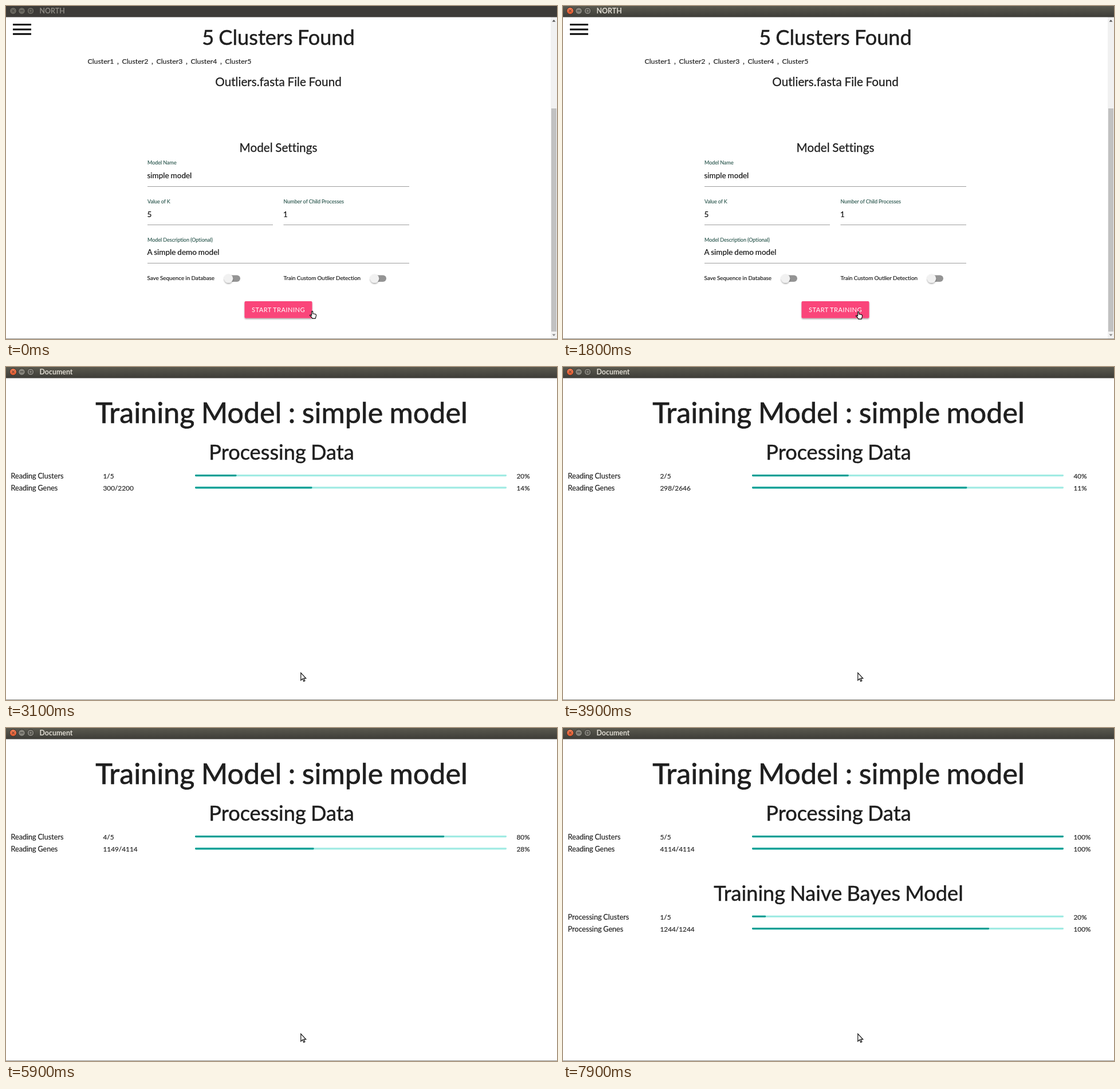
An HTML page that plays this animation: 962 px wide and 582 px high, repeating every 8 s.

```html
<!DOCTYPE html>
<html lang="en">
<head>
<meta charset="utf-8">
<title>Model training</title>
<style>
  html, body { margin: 0; width: 100%; height: 100%; overflow: hidden; background: #fff; }
  svg { display: block; width: 100%; height: 100%; }
  text {
    font: 12.6px Lato, "Open Sans", sans-serif; font-variant-ligatures: none;
    word-spacing: -.03em; white-space: pre;
    color: #1f1f1f; fill: currentColor; stroke: currentColor; stroke-width: .014em;
  }
  .mid { text-anchor: middle; }
  .h1 { font-size: 50.2px; }
  .h3 { font-size: 36.2px; }
  .h5 { font-size: 20.7px; }
  .label { font-size: 9px; color: #27544b; }
  .input { font-size: 13.5px; color: #111; }
  .option { font-size: 9.9px; color: #111; }
  .count { font-size: 11.8px; }
  .button { font-size: 11.2px; letter-spacing: .4px; color: #fff; stroke: none; }
  .caption { font-size: 12.4px; font-weight: bold; stroke: none; }
  .rule { stroke: #9e9e9e; }
</style>
</head>
<body>
<svg viewBox="0 0 962 582" preserveAspectRatio="none">
  <defs>
    <linearGradient id="active" x2="0" y2="1">
      <stop offset="0" stop-color="#5a594f"/><stop offset="1" stop-color="#3d3c37"/>
    </linearGradient>
    <linearGradient id="closeFill" x2="0" y2="1">
      <stop offset="0" stop-color="#f58159"/><stop offset="1" stop-color="#e4572b"/>
    </linearGradient>
    <filter id="shadow" x="-30%" y="-30%" width="160%" height="180%">
      <feDropShadow dx="0" dy="1.5" stdDeviation="1.3" flood-opacity=".38"/>
    </filter>
    <clipPath id="buttonShape"><rect x="416.5" y="516" width="118" height="29.5" rx="2"/></clipPath>
  </defs>
  <rect width="962" height="582" fill="#fff"/>

  <g id="form">
    <path d="M12 32.5H44M12 41H44M12 49H44" stroke="#000" stroke-width="3.2"/>
    <rect x="951" y="19" width="11" height="562" fill="#f1f1f1"/>
    <rect x="952" y="179" width="9" height="390" fill="#c1c1c1"/>
    <path d="M953.5 27.5l3-3.5l3 3.5z" fill="#505050"/>
    <path d="M953.5 573.5l3 3.5l3-3.5z" fill="#8a8a8a"/>
    <text class="h3 mid" x="475.5" y="68">5 Clusters Found</text>
    <text class="h5 mid" x="475.5" y="139.5">Outliers.fasta File Found</text>
    <text class="h5 mid" x="475.5" y="254.5">Model Settings</text>
    <text class="label" x="247" y="277">Model Name</text>
    <text class="input" x="246.5" y="301">simple model</text>
    <text class="label" x="247" y="344.5">Value of K</text>
    <text class="input" x="246.5" y="368.5">5</text>
    <text class="label" x="484.5" y="344.5">Number of Child Processes</text>
    <text class="input" x="484" y="368.5">1</text>
    <text class="label" x="247" y="412">Model Description (Optional)</text>
    <text class="input" x="246.5" y="435">A simple demo model</text>
    <path class="rule" d="M247 315.5H704M247 382.5H466M484.5 382.5H704M247 449.5H704"/>
    <text class="option" x="246.5" y="479">Save Sequence in Database</text>
    <text class="option" x="484.5" y="479">Train Custom Outlier Detection</text>
    <rect x="416.5" y="516" width="118" height="29.5" rx="2" fill="#fa447a" filter="url(#shadow)"/>
    <circle id="ripple" cx="517" cy="537" fill="#fff" fill-opacity=".3" clip-path="url(#buttonShape)"/>
    <text class="button mid" x="475.5" y="535">START TRAINING</text>
  </g>

  <g id="training">
    <text class="h1 mid" x="481" y="98">Training Model : simple model</text>
    <text class="h3 mid" x="481" y="161.5">Processing Data</text>
  </g>
  <g id="bayes">
    <text class="h3 mid" x="481" y="301.5">Training Naive Bayes Model</text>
  </g>

  <rect id="titleBar" width="962" height="19.5"/>
  <g stroke="#33322e">
    <circle id="close" cx="12.5" cy="8.5" r="6"/>
    <g id="knobs"><circle cx="27.5" cy="8.5" r="6"/><circle cx="43" cy="8.5" r="6"/></g>
    <path d="M10.3 6.3l4.4 4.4m0-4.4l-4.4 4.4M24.7 8.5h5.6M40.7 6.2h4.6v4.6h-4.6z" fill="none"/>
  </g>
  <text id="caption" class="caption" x="58.5" y="13"></text>
  <path d="M0 581.5H962" stroke="#92928f"/>

  <path id="hand" fill="#fff" stroke="#000" stroke-width="1.1" stroke-linejoin="round"
    d="M533.6 541V534.6q0-1.2 1.1-1.2t1.1 1.2v3.2l3.4.5q2.4.4 2.4 2.2l-.6 3-.8 2.6h-5.4l-1.6-2.6-2.6-2.4q-.5-1.4 1-1.2z"/>
  <path id="arrow" fill="#fff" stroke="#111" stroke-width="1.2"
    d="M514.8 534.6v13l3-2.8 2 4.6 2-.9-2-4.4h3.9z"/>
</svg>

<script>
const LOOP = 8000, STEP = 100;
const BAR_X = 330, BAR_WIDTH = 544, BAR_EASE = 450;
const CLUSTERS = 5;
const $ = id => document.getElementById(id);
const clamp = x => Math.max(0, Math.min(1, x));

function add(parent, tag, attrs, content = "") {
  const node = document.createElementNS("http://www.w3.org/2000/svg", tag);
  for (const name in attrs) node.setAttribute(name, attrs[name]);
  node.textContent = content;
  return parent.appendChild(node);
}

for (let i = 0; i < CLUSTERS; i++) {
  const x = 142.5 + 60 * i;
  add($("form"), "text", { x, y: 101, style: "font-size:12.3px" }, "Cluster" + (i + 1));
  if (i < CLUSTERS - 1) add($("form"), "text", { x: x + 51.5, y: 101 }, ",");
}
for (const x of [388.5, 643.5]) {
  add($("form"), "rect", { x: x - 6.5, y: 470.5, width: 27, height: 11.5, rx: 5.7, fill: "#949494" });
  add($("form"), "circle", { cx: x, cy: 476.3, r: 7.8, fill: "#f1f1f1", filter: "url(#shadow)" });
}

function progressRow(parent, name, y, updates) {
  const bar = { x: BAR_X, y: y - 7, width: BAR_WIDTH, height: 3.2, rx: 1.4 };
  add(parent, "text", { x: 8.5, y }, name);
  const count = add(parent, "text", { x: 169.5, y, class: "count" });
  add(parent, "rect", { ...bar, fill: "#a0ebe3" });
  const fill = add(parent, "rect", { ...bar, fill: "#0c9f95" });
  const percent = add(parent, "text", { x: 891.5, y, class: "count" });

  return t => {
    const past = updates.filter(u => u.time <= t);
    const { done, total } = past[past.length - 1];
    const share = u => u.total ? u.done / u.total : 0;
    // Every update restarts a linear transition from the current width.
    const width = past.reduce((w, u, i) => {
      const end = i + 1 < past.length ? past[i + 1].time : t;
      return w + (share(u) - w) * clamp((end - u.time) / BAR_EASE);
    }, 0);
    count.textContent = total ? `${done}/${total}` : "";
    percent.textContent = Math.round(100 * share(past[past.length - 1])) + "%";
    fill.setAttribute("width", BAR_WIDTH * width);
  };
}

// Genes are reported in equal batches, evenly spaced from a cluster's first report to its last.
function geneUpdates({ total, first, start, end }, batch) {
  const reports = Math.ceil((total - first) / batch);
  return Array.from({ length: reports + 1 }, (_, i) => ({
    time: start + (reports ? (end - start) * i / reports : 0),
    done: Math.min(total, first + i * batch),
    total
  }));
}

function progressBlock(id, verb, y, batch, clusters) {
  const finished = clusters.map(({ end }, i) => ({ time: end, done: i + 1, total: CLUSTERS }));
  const genes = clusters.flatMap(cluster => geneUpdates(cluster, batch));
  return [
    progressRow($(id), verb + " Clusters", y, [{ time: 0, done: 0, total: CLUSTERS }, ...finished]),
    progressRow($(id), verb + " Genes", y + 21.3, [{ time: 0, done: 0, total: 0 }, ...genes])
  ];
}

const rows = [
  ...progressBlock("training", "Reading", 195, 1149, [
    { total: 1244, first: 1244, start: 2800, end: 2800 },
    { total: 2200, first: 300, start: 3000, end: 3652 },
    { total: 2646, first: 298, start: 3858, end: 4800 },
    { total: 2210, first: 2210, start: 5400, end: 5400 },
    { total: 4114, first: 1149, start: 5514, end: 7026 }
  ]),
  ...progressBlock("bayes", "Processing", 334.7, 862, [
    { total: 1244, first: 862, start: 7170, end: 7800 }
  ])
];

// While the page is busy it keeps its last painted state.
const stalls = [[4100, 4400], [5000, 5400], [5900, 6200], [6800, 7100], [7200, 7400]];
function paintedTime(t) {
  const stall = stalls.find(([from, to]) => t > from && t < to);
  return stall ? stall[0] : t;
}

const show = (id, on) => $(id).setAttribute("display", on ? "inline" : "none");

function render(t) {
  const focused = t >= 1800, loaded = t >= 2400;
  show("form", !loaded);
  show("hand", !loaded);
  show("training", loaded);
  show("arrow", loaded);
  show("bayes", t >= 7100);

  $("titleBar").setAttribute("fill", focused ? "url(#active)" : "#3d3b38");
  $("close").setAttribute("fill", focused ? "url(#closeFill)" : "#696760");
  $("knobs").setAttribute("fill", focused ? "#84827a" : "#696760");
  $("caption").textContent = t < 2000 ? "NORTH" : "Document";
  $("caption").style.color = focused ? "#dfdbd2" : "#8b8881";

  const moved = clamp((t - 400) / 200);
  $("hand").setAttribute("transform", `translate(${-19 * moved} ${moved})`);
  $("ripple").setAttribute("r", 40 * clamp((t - 1800) / 200));

  const painted = paintedTime(t);
  rows.forEach(draw => draw(painted));
}

function tick(now) {
  render(Math.floor(now % LOOP / STEP) * STEP);
  requestAnimationFrame(tick);
}
render(0);
requestAnimationFrame(tick);
</script>
</body>
</html>
```
